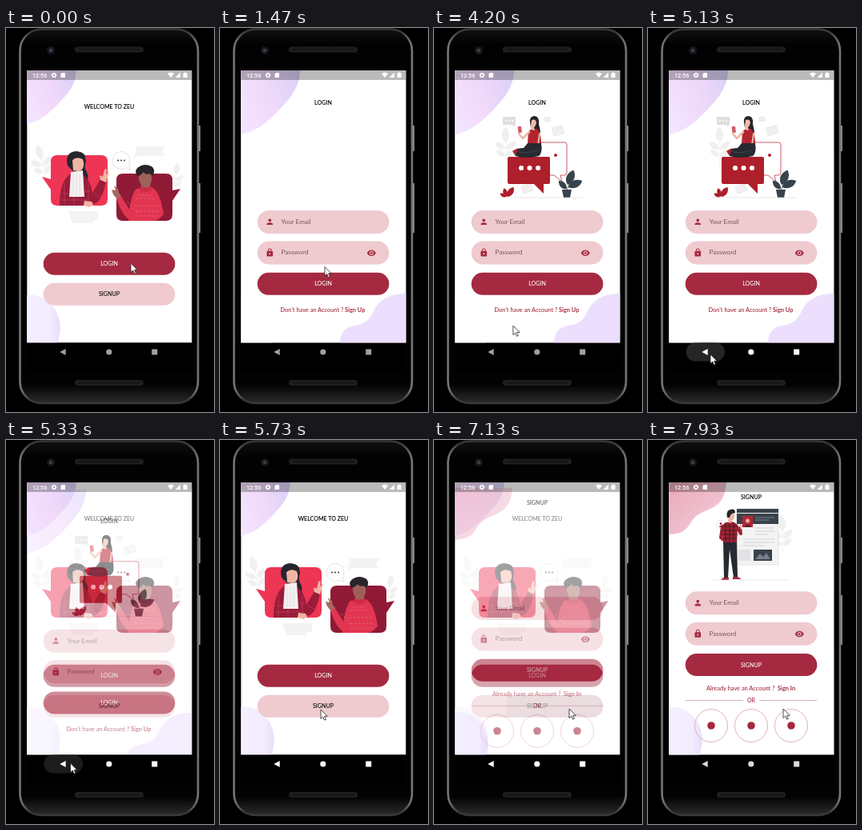
Write an HTML page that moves like this. It is 260x480 px and loops after 8000 ms.

```html
<!DOCTYPE html>
<html lang="en">
<head>
<meta charset="utf-8">
<title>Login and signup screens</title>
<style>
html, body { margin: 0; width: 100%; height: 100%; overflow: hidden; background: #000; }
svg { display: block; width: 100%; height: 100%; }
text { font-family: Lato, "Open Sans", sans-serif; font-size: 7.1px; font-weight: 500; }
.mid { text-anchor: middle; }
.title { text-anchor: middle; font-weight: 600; }
.b { font-weight: 700; }
.w { fill: #fff; }
.red { fill: #a52a41; }
.pink { fill: #efcacf; }
.hint { font-size: 8.1px; fill: #76565d; font-weight: 400; }
.small { font-size: 7.4px; fill: #a52a41; }
.pale { fill: #f1f0f1; }
.ink { fill: #262a31; }
.line { fill: none; stroke-linecap: round; stroke-linejoin: round; }
</style>
</head>
<body>
<svg viewBox="0 0 260 480">
<defs>
  <linearGradient id="lilac" x1="0" y1=".7" x2="1" y2=".3">
    <stop offset="0" stop-color="#f3e4ff"/><stop offset=".5" stop-color="#f1d9f9"/><stop offset="1" stop-color="#dcd2f9"/>
  </linearGradient>
  <linearGradient id="mist">
    <stop offset="0" stop-color="#f5effe"/><stop offset=".7" stop-color="#f3ebfe"/><stop offset="1" stop-color="#e8defb"/>
  </linearGradient>
  <linearGradient id="rose" x1="0" y1="0" x2="1" y2="1">
    <stop offset="0" stop-color="#e9a9b6"/><stop offset="1" stop-color="#f3cfe0"/>
  </linearGradient>
  <linearGradient id="rim" x1="0" x2="1">
    <stop offset="0" stop-color="#777"/><stop offset=".06" stop-color="#383838"/><stop offset=".94" stop-color="#383838"/><stop offset="1" stop-color="#777"/>
  </linearGradient>
  <linearGradient id="body" x1="0" y1="0" x2="0" y2="1">
    <stop offset="0" stop-color="#111"/><stop offset=".04" stop-color="#020202"/><stop offset=".95" stop-color="#020202"/><stop offset="1" stop-color="#2c2c2c"/>
  </linearGradient>
  <clipPath id="app"><rect x="26.300" y="53" width="206" height="340.300"/></clipPath>
  <clipPath id="loginBtn"><rect x="46.700" y="280.800" width="164.700" height="28" rx="14"/></clipPath>
  <clipPath id="signBtn"><rect x="46.700" y="318.800" width="164.700" height="28" rx="14"/></clipPath>
  <path id="top" d="M0 0H62C61 13 56 23 49 31S35 47 25 55S10 64 0 67Z"/>
  <path id="low" d="M26 334C44 332 58 343 64 357S68 384 64 394H26Z"/>
  <path id="leaf" d="M0 0C-7-4-7-13-1-19C5-14 6-6 0 0Z"/>
  <g id="bush">
    <use href="#leaf" transform="translate(0 -8)"/>
    <use href="#leaf" transform="translate(-1 0) rotate(-55) scale(.8)"/>
    <use href="#leaf" transform="translate(1 1) rotate(50) scale(.8)"/>
    <use href="#leaf" transform="translate(-1 9) rotate(-55) scale(.7)"/>
    <use href="#leaf" transform="translate(1 10) rotate(50) scale(.7)"/>
    <path d="M-.5-10H.5V19H-.5Z"/>
  </g>
  <g id="fields">
    <rect class="pink" x="46.700" y="228" width="164.700" height="29" rx="14.500"/>
    <rect class="pink" x="46.700" y="266.500" width="164.700" height="29" rx="14.500"/>
    <path class="red" transform="translate(56.500 236.500) scale(.48)" d="M12 12a4 4 0 100-8 4 4 0 000 8zm0 2c-2.700 0-8 1.300-8 4v2h16v-2c0-2.700-5.300-4-8-4z"/>
    <path class="red" transform="translate(56.500 275) scale(.48)" d="M18 8h-1V6A5 5 0 007 6v2H6a2 2 0 00-2 2v10a2 2 0 002 2h12a2 2 0 002-2V10a2 2 0 00-2-2zm-6 9a2 2 0 110-4 2 2 0 010 4zm3-9H9V6a3 3 0 016 0z"/>
    <path class="red" transform="translate(183.300 275.200) scale(.5)" d="M12 4.500C7 4.500 2.700 7.600 1 12c1.700 4.400 6 7.500 11 7.500s9.300-3.100 11-7.500c-1.700-4.400-6-7.500-11-7.500zM12 17a5 5 0 110-10 5 5 0 010 10zm0-8a3 3 0 100 6 3 3 0 000-6z"/>
    <text class="hint" x="76.500" y="245">Your Email</text>
    <text class="hint" x="76.500" y="283.300">Password</text>
    <rect class="red" x="46.700" y="305.800" width="164.700" height="28" rx="14"/>
  </g>
</defs>

<!-- phone body -->
<path d="M241.500 122V154M241.500 194V256" stroke="#8a8a8a" stroke-width="3"/>
<rect x="17.500" y="1.500" width="222.500" height="467.500" rx="27" fill="url(#body)" stroke="url(#rim)" stroke-width="2.600"/>
<circle cx="56" cy="28" r="5" fill="#15181b"/>
<circle cx="56" cy="28" r="2.300" fill="#34404a"/>
<rect x="86" y="23.500" width="86" height="7" rx="3.500" fill="#1f1f1f"/>
<rect x="90" y="25.500" width="78" height="3" rx="1.500" fill="#171717"/>
<rect x="86" y="440" width="86" height="7" rx="3.500" fill="#1f1f1f"/>
<rect x="90" y="442" width="78" height="3" rx="1.500" fill="#171717"/>
<rect x="26" y="393" width="206" height="37" fill="#000"/>

<g clip-path="url(#app)">
  <!-- welcome -->
  <g id="welcome">
    <rect class="w" x="26" y="53" width="207" height="341"/>
    <use href="#top" x="26" y="53" fill="url(#lilac)"/>
    <use href="#low" fill="url(#mist)"/>
    <text class="title" x="129" y="100.700">WELCOME TO ZEU</text>
    <g class="pale">
      <use href="#bush" transform="translate(46 172) rotate(-12)"/>
      <use href="#bush" transform="translate(211 190) rotate(12) scale(.8)"/>
      <path d="M163 148H199L195 154L198 160H165L159 164ZM77 229H115V240H109V244H82V240Z" opacity=".8"/>
    </g>
    <path d="M64 159H119Q127 159 127 167V214Q127 222 119 222H64Q56 222 56 214V202L45 186L56 189V167Q56 159 64 159Z" fill="#ee3554"/>
    <path d="M146 182H200Q208 182 208 190V203L218 201L208 216V233Q208 241 200 241H146Q138 241 138 233V190Q138 182 146 182Z" fill="#901a35"/>
    <circle cx="144" cy="165.500" r="11" fill="#fff" stroke="#d2d2d2" stroke-width=".6"/>
    <path d="M150 175L155 178L154 171" fill="#fff" stroke="#d2d2d2" stroke-width=".6"/>
    <path d="M140 165.500h.1M144 165.500h.1M148 165.500h.1" class="line" stroke="#333" stroke-width="1.800"/>
    <!-- left speaker -->
    <path d="M77 172Q73 155 88 154Q99 155 100 167Q97 174 101 180Q105 189 99 194L86 181Z" fill="#27262e"/>
    <path d="M67 222Q67 191 80 183H94Q105 187 108 206L118 189L125 192Q120 217 110 220L104 216L106 222Z" fill="#9a1c39"/>
    <path d="M81 180L96 178L98 211H79Z" fill="#f4eff0"/>
    <path d="M84 184V210M88 184V210M92 184V210" stroke="#dccfd2" stroke-width=".5"/>
    <path d="M68 207H78M69 215H104M73 193V221M99 204H106M85 211V221M103 193V214M110 207L119 212" stroke="#c24a60" stroke-width=".6"/>
    <path d="M98 216L107 217L109 221L104 224L97 222Z" fill="#f1b5a3"/>
    <path d="M83 165Q88 160 96 164Q99 172 95 177L91 179L84 178Z" fill="#f1b5a3"/>
    <path d="M81 175Q80 161 94 161Q101 165 98 158Q92 152 83 157Q76 163 81 175Z" fill="#27262e"/>
    <path d="M118 190L117 184L121 186L123 177L126 176L125 183L129 180L125 193Z" fill="#f1b5a3"/>
    <!-- right speaker -->
    <path d="M153 241Q155 210 163 201L182 199Q193 204 197 233Q190 241 184 241Z" fill="#e23551"/>
    <path d="M163 201L160 236L143 209L138 213Q146 238 158 241Z" fill="#e23551"/>
    <path d="M152 217L163 230M166 209H182M163 213H188M162 222H190M163 229H193M164 235H190" class="line" stroke="#ee7486" stroke-width=".7" stroke-dasharray="2 3"/>
    <path d="M139 214L134 208L132 202L137 203L135 197L140 201L141 206L144 210Z" fill="#a7695d"/>
    <path d="M166 182Q174 173 182 182L182 191Q179 198 180 202L169 202V196Q165 191 166 182Z" fill="#9d6157"/>
    <path d="M164 185Q159 177 167 173Q174 169 182 173Q188 177 183 185L179 182Q174 184 172 180Q168 185 164 185Z" fill="#29232a"/>
    <path d="M168 198Q174 201 181 198L182 203Q174 207 167 203Z" fill="#cf2946"/>
    <rect class="red" x="46.700" y="280.800" width="164.700" height="28" rx="14"/>
    <g clip-path="url(#loginBtn)"><circle id="loginInk" cy="295" fill="#ccc" opacity=".16"/></g>
    <text class="mid w" x="129" y="297.300">LOGIN</text>
    <rect class="pink" x="46.700" y="318.800" width="164.700" height="28" rx="14"/>
    <g id="signInk" clip-path="url(#signBtn)">
      <rect x="46" y="318" width="166" height="30" fill="#cf9aa6" opacity=".25"/>
      <circle cx="168" cy="336" fill="#b5a0a4" opacity=".5"/>
    </g>
    <text class="mid" x="129" y="335.300">SIGNUP</text>
  </g>

  <!-- login -->
  <g id="login">
    <rect class="w" x="26" y="53" width="207" height="341"/>
    <use href="#top" transform="translate(26 53) scale(1.200)" fill="url(#lilac)"/>
    <path d="M150 394C150 380 157 374 168 372S186 367 192 354S210 332 233 332V394Z" fill="#ecdffd"/>
    <text class="title" x="129" y="95.500">LOGIN</text>
    <g id="loginArt">
      <path d="M87 111H101Q102 111 102 112V120L100 124L98 121H87Q86 121 86 120V112Q86 111 87 111Z" fill="#dedede"/>
      <path d="M90 116h.1M94 116h.1M98 116h.1" class="line" stroke="#fff" stroke-width="1.800"/>
      <path class="pale" d="M147 125L160 122L163 131L150 135ZM109 198L121 194L124 203L112 207ZM138 112L145 111L146 116L139 117Z" stroke="#ddd" stroke-width=".5"/>
      <use class="pale" href="#bush" x="90" y="151"/>
      <path d="M124 143H163Q166 143 166 146V181Q166 184 163 184H158L160 192L150 184H124Z" fill="#fff" stroke="#bd3340" stroke-width=".8"/>
      <circle cx="152" cy="159" r="2" fill="#b3202c"/>
      <path d="M94 161H143Q145 161 145 163V193Q145 195 143 195H137V207L125 195H94Q92 195 92 193V163Q92 161 94 161Z" fill="#ad1f2b"/>
      <path d="M109 175h.1M119.500 175h.1M130 175h.1" class="line" stroke="#fff" stroke-width="6"/>
      <path d="M120 118Q119 110 126 110Q132 111 131 120Q135 134 131 142L123 138Z" fill="#25262c"/>
      <path d="M117 145L118 130Q121 125 128 126Q134 129 134 146Z" fill="#b4242f"/>
      <path d="M119 130L111 138L106 132" class="line" stroke="#eeb5a4" stroke-width="2.500"/>
      <rect x="105" y="123" width="4.500" height="8" rx="1" fill="#d55a64" transform="rotate(-8 107 127)"/>
      <path d="M122 115Q127 113 128 118Q127 123 125 124L126 128L121 127V122Z" fill="#f0baa8"/>
      <path d="M132 132L130 146L124 146" class="line" stroke="#eeb5a4" stroke-width="2"/>
      <path class="ink" d="M117 144H134Q136 156 131 160Q115 164 102 160L99 154Q104 150 112 150Z"/>
      <path d="M103 154Q114 158 129 153" class="line" stroke="#4a4e57" stroke-width=".7"/>
      <path d="M102 160L105 150L98 154Z" fill="#ad1f2b"/>
      <g fill="#37434d">
        <use href="#leaf" transform="translate(167 196) rotate(25) scale(1.050)"/>
        <use href="#leaf" transform="translate(168 199) rotate(68)"/>
        <use href="#leaf" transform="translate(166 201) rotate(-42) scale(.75)"/>
        <path d="M160 202H172L170 212H162Z"/>
      </g>
      <path d="M166 203L175 181" stroke="#37434d" stroke-width=".8"/>
      <g fill="#ad1f2b">
        <use href="#leaf" transform="translate(91 211) rotate(-15) scale(.6)"/>
        <use href="#leaf" transform="translate(92 211) rotate(35) scale(.75)"/>
        <use href="#leaf" transform="translate(90 211) rotate(-58) scale(.45)"/>
      </g>
      <path d="M78 212H186" stroke="#d9d9d9" stroke-width=".6"/>
    </g>
    <use href="#fields"/>
    <text class="mid w" x="129" y="322.300">LOGIN</text>
    <text class="small" x="75.500" y="355.300">Don't have an Account ?</text>
    <text class="small b" x="156" y="355.300">Sign Up</text>
  </g>

  <!-- signup -->
  <g id="signup">
    <rect class="w" x="26" y="53" width="207" height="341"/>
    <path d="M26 53H98C97 69 92 79 80 85S61 91 53 104S37 117 26 118Z" fill="url(#rose)"/>
    <use href="#low" fill="url(#mist)"/>
    <text class="title" x="129" y="73.800">SIGNUP</text>
    <g id="signupArt">
      <use class="pale" href="#bush" transform="translate(168 122) scale(1.050)"/>
      <rect x="111" y="87" width="52" height="69" fill="#f3f3f4" stroke="#d5d5d7" stroke-width=".6"/>
      <path d="M111 86H163V91H111ZM111 92H163V105H111Z" fill="#39424a"/>
      <path d="M134 97H158M134 100H151" stroke="#7b838a"/>
      <rect x="118" y="95" width="13" height="14" fill="#b32735"/>
      <circle cx="124.500" cy="101" r="2.500" fill="#e9b0a4"/>
      <path d="M120 109Q124 102 129 109Z" fill="#662029"/>
      <path d="M134 110H158M134 114H158M134 118H150M119 124H158M119 128H158M119 132H145" stroke="#d2d3d6" stroke-width="1.200"/>
      <rect x="132" y="137" width="23" height="14" fill="#39424a"/>
      <path d="M134 149L140 142L144 146L148 141L153 149Z" fill="#76808a"/>
      <rect x="113" y="137" width="15" height="14" fill="#e3e3e5"/>
      <circle cx="91" cy="106" r="5.500" fill="#fff" stroke="#ddd" stroke-width=".7"/>
      <path class="red" d="M88.500 109Q91 105 93.500 109ZM91 103a1.500 1.500 0 110 3 1.500 1.500 0 010-3Z"/>
      <path d="M94 126H111L112 172H107L102 137L100 173H95Z" class="ink"/>
      <path d="M94 172H101V175H91ZM106 171H112L117 174H106Z" fill="#a2293a"/>
      <path d="M92 108Q95 102 104 102Q111 103 112 108L111 128H94Z" fill="#9f2133"/>
      <path d="M110 107L116 117L115 110" class="line" stroke="#9f2133" stroke-width="4"/>
      <path d="M93 108L91 122L96 126" class="line" stroke="#9f2133" stroke-width="4"/>
      <path d="M93 108H112M93 113H112M93 118H112M94 123H111M97 104V127M102 103V128M107 103V128" stroke="#351d25" stroke-width=".9"/>
      <path d="M115 110L115 105L118 107L117 112Z" fill="#efb6a4"/>
      <path d="M101 91H108V97Q106 102 104 101V104L100 103Z" fill="#efb6a4"/>
      <path d="M99 97Q97 88 103 87Q109 85 109 91Q103 91 102 97Z" fill="#25262c"/>
      <path d="M80 175H175" stroke="#ddd" stroke-width=".6"/>
    </g>
    <use href="#fields" y="-38.700"/>
    <text class="mid w" x="129" y="283.600">SIGNUP</text>
    <text class="small" x="73" y="313.300">Already have an Account ?</text>
    <text class="small b" x="162" y="313.300">Sign In</text>
    <path d="M47 325.500H119M139 325.500H211" stroke="#bd8c95" stroke-width=".7"/>
    <text class="mid red" x="129" y="328.200">OR</text>
    <g fill="none" stroke="#dfa9b3" stroke-width=".9">
      <circle cx="79" cy="357" r="20.500"/><circle cx="129" cy="357" r="20.500"/><circle cx="179" cy="357" r="20.500"/>
    </g>
    <g class="red"><circle cx="79" cy="357" r="4.800"/><circle cx="129" cy="357" r="4.800"/><circle cx="179" cy="357" r="4.800"/></g>
  </g>

  <!-- status bar -->
  <rect x="26" y="53" width="207" height="12" fill="#000" opacity=".27"/>
  <g class="w">
    <text x="33" y="61.800" style="font:500 7.200px Roboto,sans-serif">12:56</text>
    <circle cx="60" cy="59" r="2" fill="none" stroke="#fff" stroke-width="1.600"/>
    <circle cx="60" cy="59" r="3" fill="none" stroke="#fff" stroke-width="1" stroke-dasharray="1.200 1.150"/>
    <path d="M70 56H74V62H68.500V57.500Z"/>
    <path d="M202 57Q206 53.800 210 57L206 62ZM218 55.500V62H211.500ZM221.500 56.300H223V55.500H225V56.300H226.500V62H221.500Z"/>
  </g>
</g>

<!-- navigation -->
<rect id="navInk" x="47.500" y="393.500" width="48.500" height="23" rx="11.500" fill="#252525"/>
<g id="nav">
  <path d="M67.300 405L74.700 401V409Z"/><circle cx="128.800" cy="405" r="3.600"/><rect x="182.200" y="401.500" width="7" height="7"/>
</g>
<path id="cursor" d="M0 0V11.500L2.700 9L4.500 13.200L6.400 12.400L4.600 8.300H8.200Z" fill="#fff" stroke="#222" stroke-width=".8"/>
</svg>

<script>
const LOOP = 8000;
const $ = id => document.getElementById(id);
const set = (el, attrs) => { for (const k in attrs) el.setAttribute(k, attrs[k]); };
const show = (id, on) => set($(id), { visibility: on ? "inherit" : "hidden" });
const ramp = (t, a, b) => Math.min(1, Math.max(0, (t - a) / (b - a)));
const ease = p => p * p * (3 - 2 * p);
const out = p => 1 - (1 - p) ** 3;

// cursor stops: time, x, y
const stops = [
  [0, 156, 294], [70, 156, 294], [470, 131, 298.5], [1670, 131, 298.5], [2070, 128, 310],
  [2470, 128, 310], [3130, 120, 336], [3800, 120, 336], [4600, 78, 408], [5270, 78, 408],
  [5700, 126, 337], [5930, 126, 337], [6330, 165, 333], [6470, 165, 333], [6600, 169, 336],
  [LOOP, 169, 336]
];

function cursorAt(t) {
  const i = stops.findIndex(s => s[0] > t);
  const [t0, x0, y0] = stops[i - 1], [t1, x1, y1] = stops[i];
  const p = ease(ramp(t, t0, t1));
  return [x0 + (x1 - x0) * p, y0 + (y1 - y0) * p];
}

// a page fades in while rising a quarter of the screen
function page(id, p) {
  show(id, p > 0);
  set($(id), { opacity: p, transform: `translate(0 ${85 * (1 - out(p))})` });
}

function draw(t) {
  page("login", t < 1470 ? 0 : 1 - ramp(t, 5200, 5480));
  page("signup", ramp(t, 6960, 7260));
  show("loginArt", t >= 1670);
  show("signupArt", t >= 7330);

  const tap = out(ramp(t, 70, 470));
  set($("loginInk"), { cx: 156 - 11 * tap, r: t < 1470 ? 63 * tap : 0 });
  show("signInk", t >= 6800);
  set($("signInk").lastElementChild, { r: 4 + 90 * ramp(t, 6810, 7200) });

  set($("navInk"), { opacity: ramp(t, 5050, 5110) * (1 - ramp(t, 5250, 5600)) });
  const glow = t < 5070 ? 160 : 250 - 30 * ramp(t, 7670, 7930);
  set($("nav"), { fill: `rgb(${glow},${glow},${glow})` });
  set($("cursor"), { transform: `translate(${cursorAt(t)})` });
}

function frame(now) {
  draw(now % LOOP);
  requestAnimationFrame(frame);
}
draw(0);
requestAnimationFrame(frame);
</script>
</body>
</html>
```
